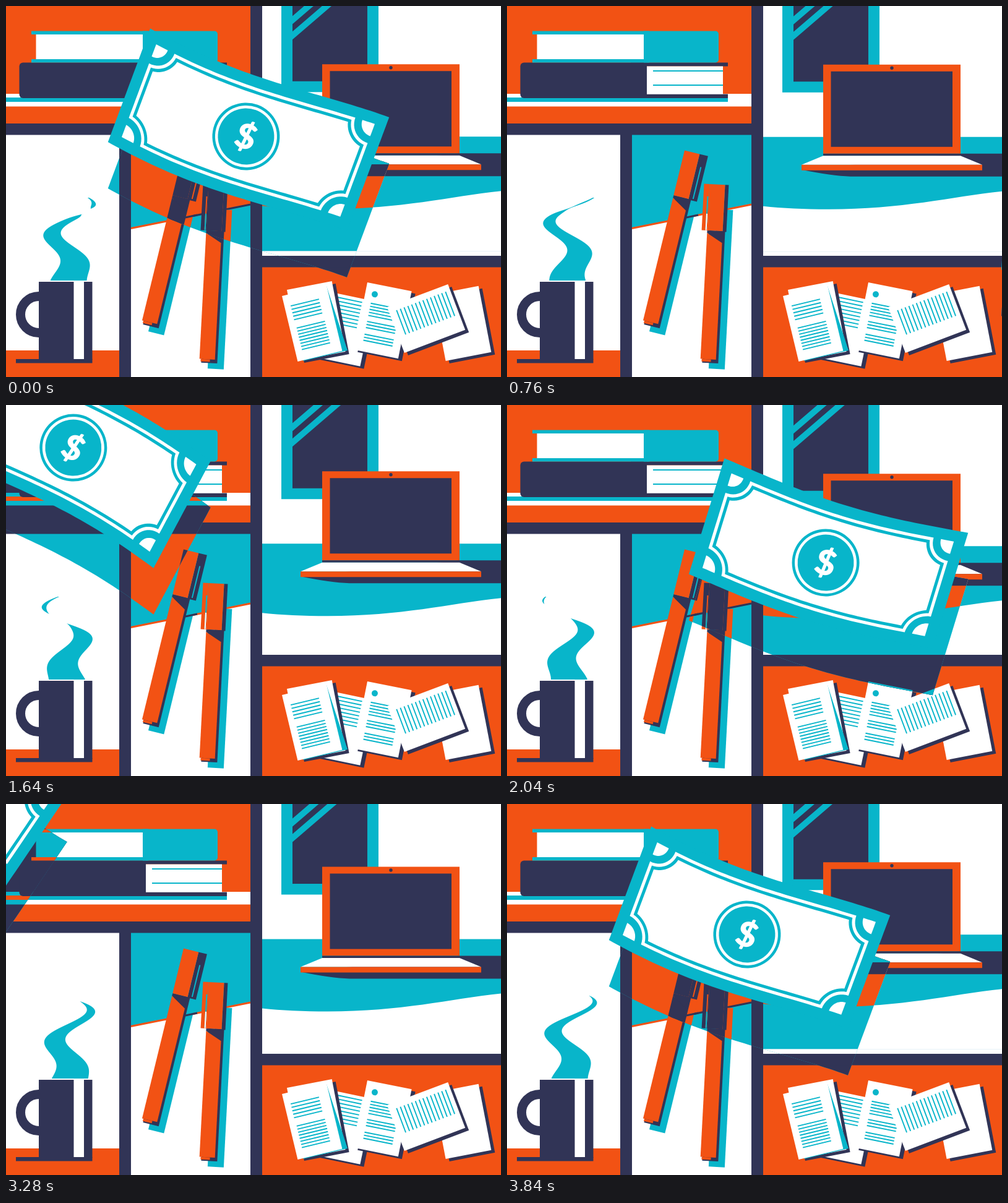
Animation, 800 px wide and 600 px high, one loop 3.88 s. Source, as an HTML page with a canvas:

```html
<!DOCTYPE html>
<html lang="en">
<head>
<meta charset="utf-8">
<title>Flying banknote</title>
<style>
  html, body { margin: 0; width: 100%; height: 100%; overflow: hidden; background: #fff; }
  canvas { display: block; width: 800px; height: 600px; }
</style>
</head>
<body>
<canvas id="stage" width="800" height="600"></canvas>
<script>
const ctx = document.getElementById('stage').getContext('2d');
const LOOP = 3880, CYCLE = 3840, PASS = CYCLE / 2, STEP = 40, TAU = Math.PI * 2;
const WHITE = '#fff', TEAL = '#08b5ca', ORANGE = '#f25214', NAVY = '#313456';
const LIT = { w: WHITE, t: TEAL, o: ORANGE, n: NAVY };
const SHADED = { w: TEAL, t: ORANGE, o: NAVY, n: NAVY };

function rect(c, x0, y0, x1, y1) {
  ctx.fillStyle = c;
  ctx.fillRect(x0, y0, x1 - x0, y1 - y0);
}
function trace(pts) {
  ctx.beginPath();
  pts.forEach(([x, y]) => ctx.lineTo(x, y));
  ctx.closePath();
}
function fill(c, pts) {
  trace(pts);
  ctx.fillStyle = c;
  ctx.fill();
}
function line(c, width, x0, y0, x1, y1) {
  ctx.strokeStyle = c;
  ctx.lineWidth = width;
  ctx.beginPath();
  ctx.moveTo(x0, y0);
  ctx.lineTo(x1, y1);
  ctx.stroke();
}
function disc(c, x, y, r) {
  ctx.fillStyle = c;
  ctx.beginPath();
  ctx.arc(x, y, r, 0, TAU);
  ctx.fill();
}
function rounded(c, x0, y0, x1, y1, radii) {
  ctx.fillStyle = c;
  ctx.beginPath();
  ctx.roundRect(x0, y0, x1 - x0, y1 - y0, radii);
  ctx.fill();
}
function placed(x, y, deg, draw) {
  ctx.save();
  ctx.translate(x, y);
  ctx.rotate(deg * Math.PI / 180);
  draw();
  ctx.restore();
}
function textLines(c, x, y, width, count, gap) {
  for (let i = 0; i < count; i++) line(c, 1.9, x, y + i * gap, x + width, y + i * gap);
}

function books(p) {
  rect(p.o, 0, 0, 395, 190);
  rect(p.w, 0, 142, 395, 162.5);
  rect(p.t, 0, 148, 357, 155);
  // lower book
  rounded(p.n, 21.5, 91.5, 226, 149, [6, 0, 0, 6]);
  rect(p.n, 200, 91.5, 357, 97.5);
  rect(p.n, 200, 142.5, 357, 149);
  rect(p.w, 226, 97.5, 349, 142.5);
  textLines(p.t, 236, 105, 113, 2, 23);
  textLines(p.t, 268, 122.5, 81, 1);
  textLines(p.t, 251, 134, 98, 1);
  // upper book
  rect(p.t, 41, 40.5, 230, 46);
  rect(p.t, 41, 86, 230, 91.5);
  rounded(p.t, 221, 40.5, 342, 91.5, [0, 5, 5, 0]);
  rect(p.w, 48.5, 46, 221, 86);
  textLines(p.t, 49, 53, 156, 1);
  textLines(p.t, 49, 68.5, 119, 1);
  textLines(p.t, 49, 79, 135, 1);
}

function pen(p, x, y, deg, clipLeft) {
  placed(x, y, deg, () => {
    rect(p.t, 14, 40, 40, 298);
    rect(p.n, 3, 75, 29, 289);
    rect(p.n, 25, 0, clipLeft ? 31 : 39, 76);
    rect(p.o, 0, 0, 25, 75);
    if (clipLeft) rect(p.o, -9, 0, 0, 75);
    fill(p.n, [[0, 75], [25, 75], [25, 94], [0, 79]]);
    fill(p.o, [[0, 79], [25, 94], [25, 283], [0, 283]]);
    rect(p.o, 2, 283, 17, 287);
    const slit = clipLeft ? -2 : 32;
    line(p.t, 2, slit, 20, slit, 73);
    if (clipLeft) line(p.w, 2, slit, 48, slit, 75);
  });
}

function pens(p) {
  fill(p.t, [[202, 208], [395, 208], [395, 320], [202, 359]]);
  line(p.o, 3, 202, 359.5, 395, 321);
  pen(p, 287, 233.5, 13.7, false);
  line(p.n, 3, 290, 342, 309, 338);
  pen(p, 327.5, 288, 3, true);
}

function steam(p, t) {
  const bump = (y, at, size) => Math.exp(-(((y - at) / size) ** 2));
  const grow = Math.min(1, Math.max(0, (t - 800) / 700));
  const left = [], right = [];
  for (let y = 444; y >= 310; y--) {
    const sway = Math.max(3, 9 + (425 - y) * 0.31);
    const mid = 100.5 + sway * Math.cos(TAU * ((y - 422) / 100 + t / CYCLE));
    // rising gaps break the wisp apart
    const gap = 25 * grow * bump(y, 348 - 0.0275 * (t - 1640), 14)
      + 22 * Math.max(0, 1 - t / 1200) * bump(y, 333 - 0.008 * t, 6);
    const half = Math.max(0, 59 * ((y - 305) / 139) ** 0.95 - gap) / 2;
    left.push([mid - half, y]);
    right.unshift([mid + half, y]);
  }
  fill(p.t, [...left, ...right]);
}

function mug(p, t) {
  rect(p.o, 0, 557, 183, 600);
  ctx.fillStyle = p.w;
  ctx.beginPath();
  ctx.arc(53, 499, 29.5, TAU / 4, TAU * 3 / 4);
  ctx.fill();
  ctx.strokeStyle = p.n;
  ctx.lineWidth = 15;
  ctx.stroke();
  rect(p.n, 53, 446, 139.5, 572);
  rect(p.w, 109.5, 446, 126, 571);
  rect(p.n, 16, 571, 139.5, 577.5);
  steam(p, t);
}

function desk(p, t) {
  const lift = 8.3 - 9.6 * Math.cos(TAU * (t - 350) / CYCLE);
  ctx.save();
  ctx.beginPath();
  ctx.rect(414, 0, 386, 404);
  ctx.clip();
  rect(WHITE, 414, 0, 800, 404);
  ctx.translate(0, lift);
  rect(p.w, 414, -30, 800, 396.5);
  rect('#e6f2f7', 414, 396, 800, 397);
  // window
  rect(p.t, 445, -40, 602, 139);
  rect(p.n, 463, -40, 584, 121.5);
  for (const y of [16, 41]) fill(p.t, [[463, y], [563, y - 86], [563, y - 73], [463, y + 13]]);
  // table top
  ctx.fillStyle = p.t;
  ctx.beginPath();
  ctx.moveTo(414, 211);
  ctx.lineTo(800, 211);
  ctx.lineTo(800, 299);
  ctx.bezierCurveTo(715, 308, 640, 328, 520, 328);
  ctx.quadraticCurveTo(460, 328, 414, 323);
  ctx.fill();
  // laptop
  ctx.fillStyle = p.n;
  ctx.beginPath();
  ctx.moveTo(733, 238);
  ctx.lineTo(800, 238);
  ctx.lineTo(800, 275);
  ctx.lineTo(555, 275);
  ctx.quadraticCurveTo(525, 274, 476, 264);
  ctx.fill();
  rect(p.o, 511, 94, 733, 238);
  rect(p.n, 523.5, 105, 720, 227);
  disc(p.n, 622, 99.5, 2.7);
  rect(p.n, 511, 238, 733, 241.5);
  fill(p.w, [[511, 241.5], [733, 241.5], [768, 256], [476, 256]]);
  rect(p.o, 476, 256, 768, 265);
  ctx.restore();
}

function sheet(p, x, y, deg, w, h, shade, print) {
  if (shade) placed(x + 6, y + 4, deg, () => rect(shade, 0, 0, w, h));
  placed(x, y, deg, () => {
    rect(p.w, 0, 0, w, h);
    if (print) print();
  });
}

function papers(p) {
  rect(p.o, 414, 422, 800, 600);
  sheet(p, 690, 467, -10.9, 75, 109, p.n);
  sheet(p, 522, 462, 11.8, 74, 108, p.n, () => textLines(p.t, 14, 6, 42, 8, 6));
  sheet(p, 454, 459, -10.9, 74, 116, p.n);
  fill(p.t, [[518, 453], [552, 557], [480, 574]]);
  sheet(p, 446, 469, -13.5, 74, 109, null, () => {
    textLines(p.t, 8, 11, 20, 1);
    textLines(p.t, 10, 19, 47, 5, 5.7);
    textLines(p.t, 11, 56, 47, 8, 5.1);
  });
  sheet(p, 584, 447, 11.3, 73, 111, p.n, () => {
    disc(p.t, 15.5, 16.5, 5);
    textLines(p.t, 28, 17, 26, 1);
    textLines(p.t, 12, 32, 44, 5, 5);
    textLines(p.t, 12, 62, 48, 3, 5);
    textLines(p.t, 12, 83, 48, 3, 5);
  });
  sheet(p, 616, 487, -20.7, 105, 79, p.n, () => {
    ctx.rotate(TAU / 4);
    textLines(p.t, 10, -97, 42, 14, 6.5);
  });
}

function scene(p, t) {
  rect(p.w, 0, 0, 800, 600);
  books(p);
  mug(p, t);
  pens(p);
  desk(p, t);
  papers(p);
  rect(p.n, 0, 190, 414, 208.5);
  rect(p.n, 183, 208, 202, 600);
  rect(p.n, 395, 0, 414, 600);
  rect(p.n, 414, 404, 800, 422.5);
}

const W = 206, H = 98, INSET = 18;
const CORNERS = [[-1, -1], [1, -1], [1, 1], [-1, 1]];
const SHEET = CORNERS.map(([sx, sy]) => [sx * W, sy * H]);

function cornerArc([sx, sy], r, from) {
  const pts = [];
  for (let i = 0; i <= 12; i++) {
    const k = sx * sy > 0 ? 12 - i : i;
    const a = from + (TAU / 4 - 2 * from) * k / 12;
    pts.push([sx * (W - INSET - r * Math.cos(a)), sy * (H - INSET - r * Math.sin(a))]);
  }
  return pts;
}
const frame = (inset, r) => CORNERS.flatMap(c => cornerArc(c, r, Math.asin((inset - INSET) / r)));

// a wave that runs along the note, held at both ends
const wave = (s, phase) => 15.5 * (1 - s * s) * Math.cos(phase - 0.8 * s);

function bend(pts, phase) {
  return pts.flatMap(([x0, y0], i) => {
    const [x1, y1] = pts[(i + 1) % pts.length];
    const n = Math.ceil(Math.hypot(x1 - x0, y1 - y0) / 8) || 1;
    return Array.from({ length: n }, (_, k) => {
      const x = x0 + (x1 - x0) * k / n, y = y0 + (y1 - y0) * k / n;
      return [x, y + wave(x / W, phase)];
    });
  });
}

function note(t) {
  const pass = (t + PASS / 2) % PASS - PASS / 2;
  const e = Math.sin(Math.PI * pass / PASS);
  const x = 392 + 654 * e;
  const y = 200 + 224 * e - 96 * e * e + 20 * e ** 3;
  const tilt = 20.4 - 17.3 * e;
  const phase = TAU * (pass - 110) / (PASS / 2);
  const shape = (c, pts) => fill(c, bend(pts, phase));

  ctx.save();
  placed(x, y + 75, tilt, () => trace(bend(SHEET, phase)));
  ctx.clip();
  scene(SHADED, t);
  ctx.restore();

  placed(x, y, tilt, () => {
    shape(TEAL, SHEET);
    shape(WHITE, frame(INSET, 33));
    shape(TEAL, frame(INSET + 5, 38));
    shape(WHITE, frame(INSET + 10, 43));
    for (const c of CORNERS) {
      shape(WHITE, [[c[0] * (W - INSET), c[1] * (H - INSET)], ...cornerArc(c, 21, 0)]);
    }
    ctx.translate(0, wave(0, phase));
    disc(TEAL, 0, 0, 54.5);
    disc(WHITE, 0, 0, 50);
    disc(TEAL, 0, 0, 45.5);
    ctx.fillStyle = WHITE;
    ctx.font = '900 56px Lato, sans-serif';
    ctx.textAlign = 'center';
    ctx.fillText('$', 0, 20);
  });
}

function draw(now) {
  const t = Math.min(CYCLE, Math.floor(now % LOOP / STEP) * STEP);
  scene(LIT, t);
  note(t);
}

let start;
function tick(now) {
  start ??= now;
  draw(Math.max(0, now - start));
  requestAnimationFrame(tick);
}
draw(0);
requestAnimationFrame(tick);
</script>
</body>
</html>
```
